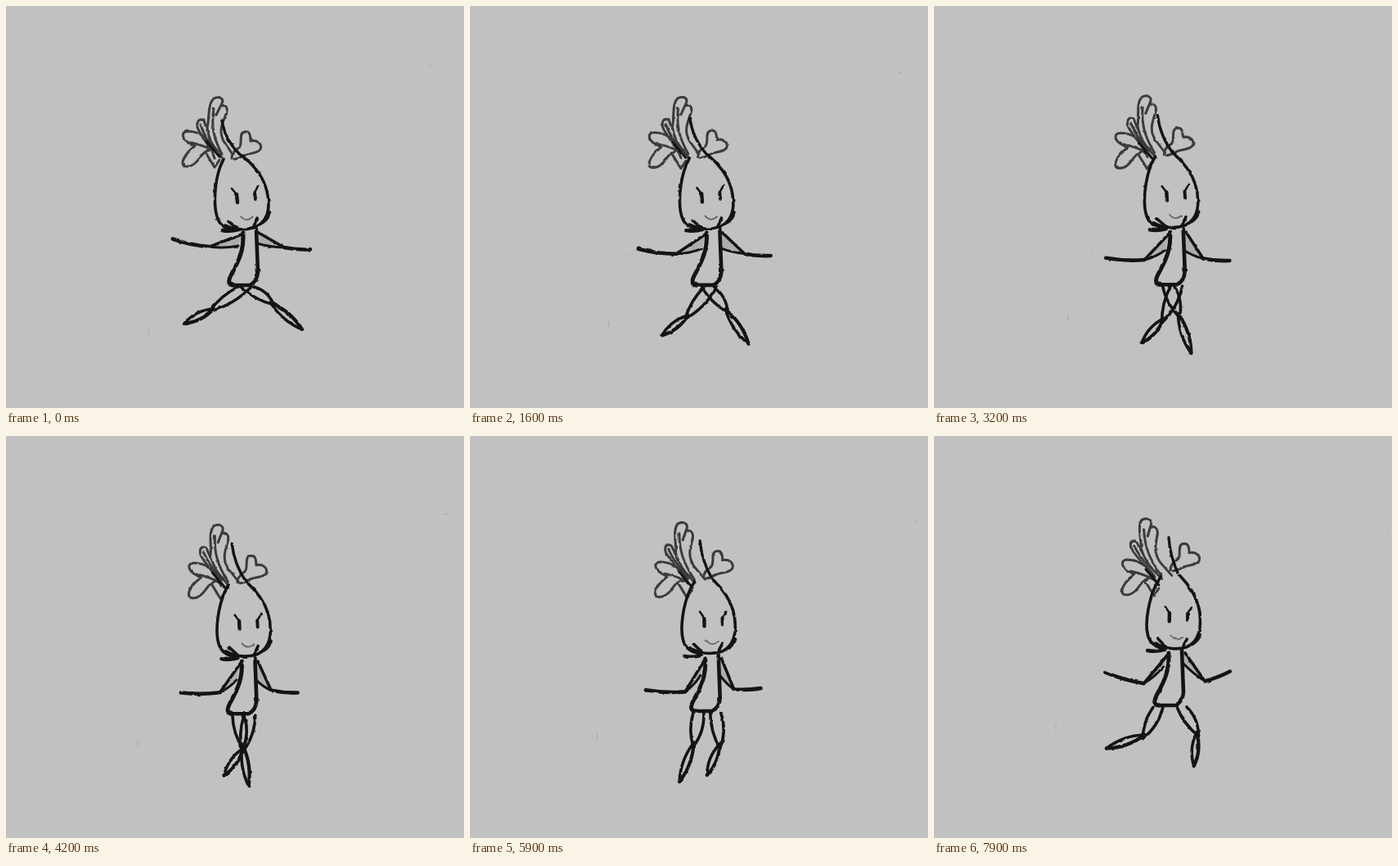
Write an HTML page that moves like this. It is 560 by 491 pixels and loops after 8000 ms.

```html
<!DOCTYPE html>
<html>
<head>
<meta charset="utf-8">
<style>
html, body { margin: 0; width: 100%; height: 100%; overflow: hidden; background: #c1c1c1; }
svg { display: block; }
</style>
</head>
<body>
<svg width="560" height="491" viewBox="0 0 560 491" fill="none" stroke-linecap="round" stroke-linejoin="round">
  <filter id="pencil" filterUnits="userSpaceOnUse" x="0" y="0" width="560" height="491" color-interpolation-filters="sRGB">
    <feTurbulence type="fractalNoise" baseFrequency=".12" numOctaves="2" seed="4"/>
    <feDisplacementMap in="SourceGraphic" scale="2.5" xChannelSelector="R" yChannelSelector="G"/>
    <feGaussianBlur stdDeviation=".7"/>
  </filter>
  <g id="figure" filter="url(#pencil)"></g>
</svg>
<script>
const LOOP = 8000, STEP = 100, END = 7900, PASS = 5100;

const mix = (a, b, u) => a + (b - a) * u;

// Linear tween over three poses: stretched, passing, stretched the other way
const swing = ([a, b, c], t) =>
  t < PASS ? mix(a, b, t / PASS) : mix(b, c, (t - PASS) / (END - PASS));

// Far end of a bone, from its angles in degrees and its first and last length
function joint([x, y], angles, [from, to], t) {
  const a = swing(angles, t) * Math.PI / 180, len = mix(from, to, t / END);
  return [x + len * Math.cos(a), y + len * Math.sin(a)];
}

const line = (d, width = 3.6, color = '#141414') =>
  `<path d="${d}" stroke="${color}" stroke-width="${width}"/>`;
const soft = (d, width = 3) => line(d, width, '#3b3b3b');
const group = (transform, body) => `<g transform="${transform}">${body}</g>`;

// Curve from p to q, pushed sideways by b
function bend([x, y], [X, Y], b) {
  const len = Math.hypot(X - x, Y - y) || 1;
  const cx = (x + X) / 2 - (Y - y) / len * b, cy = (y + Y) / 2 + (X - x) / len * b;
  return `M${x} ${y}Q${cx} ${cy} ${X} ${Y}`;
}

function leg([x, y], half, thigh, thighLen, shin, shinLen, t) {
  const knee = joint([x, y], thigh, thighLen, t), foot = joint(knee, shin, shinLen, t);
  const top = [mix(knee[0], x, .12), mix(knee[1], y, .12)];
  return line(bend([x - half, y], knee, 6)) + line(bend([x + half, y], knee, -8))
    + line(bend(top, foot, 8)) + line(bend(top, foot, -8), 4.2);
}

function arm(shoulder, side, upper, upperLen, fore, foreLen, sag, t) {
  const elbow = joint(shoulder, upper, upperLen, t), hand = joint(elbow, fore, foreLen, t);
  return `<path d="M${shoulder}L${elbow}L${side}Z" fill="#000" opacity=".1"/>`
    + line(bend(shoulder, elbow, 0)) + line(bend(side, elbow, sag), 3)
    + line(bend(elbow, hand, sag), 4.6);
}

const head = line('M266 187L262 196C255 215 253 245 259 260Q264 273 281 274')
  + line('M268 268Q287 277 307 269Q320 262 321 244C321 225 314 210 306 200Q299 191 289 183')
  + line('M272 263L282 271') + line('M303 269L307 259') + line('M314 264Q321 259 322 252', 4.4)
  + line('M276 223L282 230', 2.6) + line('M282 230L283 240', 4.4)
  + line('M308 220L304 228', 2.6) + line('M304 228L305 236', 4)
  + line('M287 257Q294 265 302 257', 1.8, '#666');

const torso = line('M290 277C291 300 284 312 275 329Q269 341 279 341', 5)
  + line('M276 341L298 341Q307 337 308 325L306 273', 4.6)
  + line('M264 274Q274 276 285 273', 4.4);

const blades = soft('M264 185C252 172 247 160 246 148C249 138 246 121 254 113C260 110 267 112 264 119L257 133')
  + soft('M264 122C269 120 272 125 269 132C264 145 260 152 266 165L277 181')
  + soft('M254 125C251 145 253 160 264 181')
  + soft('M255 186C251 172 237 158 234 148C233 140 237 137 242 140L246 152')
  + soft('M238 145C243 160 249 170 259 177');

const leftLeaf = soft('M256 174C248 162 236 153 222 153C214 154 215 161 222 166Q227 169 231 171C222 178 213 188 217 195C226 199 234 190 238 184Q242 178 250 175')
  + soft('M226 167Q242 170 256 178') + line('M245 165L261 184', 3) + soft('M244 179L255 197L261 188');

const rightLeaf = soft('M276 186Q276 178 285 173C290 168 284 156 291 154C298 152 299 158 299 165C306 163 314 168 311 175C307 181 297 179 290 183Q283 187 279 187');

function draw(t) {
  const p = t / END, up = -13 * p * p, rise = -12 * p ** 3;
  const lean = .2 * p, droop = Math.sin(Math.PI * p);
  const hipY = 343 + rise, half = 8 - 2 * p;
  const stem = bend([264 + 23 * p, 140 - 16 * p], [289 + 9 * p, 184 + up - 4 * p], 9 - 5 * p);

  figure.innerHTML =
    group(`matrix(1 0 ${lean} 1 ${-112 * lean} ${up * .82})`, blades)
    + group(`translate(${14 * p} ${3 * droop - 2 * p})`, leftLeaf)
    + group(`translate(${13 * p} ${up * 1.4 - 4 * p})`, rightLeaf)
    + line(stem, 3.4)
    + group(`translate(${p} ${up}) rotate(${7 * p} 290 270)`, head)
    + arm([288 - 2 * p, 279 + rise], [284 - 3 * p, 293 + 6 * droop + rise],
      [159, 118, 130], [42, 46], [192, 177, 196], [46, 49], -3, t)
    + arm([309 - 2 * p, 277 + rise], [307 - 2 * p, 290 + 10 * droop + rise],
      [30, 73, 55], [36, 42], [4, 5, -21], [32, 33], 2, t)
    + group(`translate(${-3 * p} ${rise})`, torso)
    + leg([292 + 11 * p, hipY], half, [145, 92, 60], [53, 41], [155, 123, 99], [34, 37], t)
    + leg([295 - 21 * p, hipY], half, [34, 92, 116], [39, 43], [41, 90, 165], [46, 46], t)
    // drifting specks
    + line(`M${519 + 36 * p} ${73 + 42 * p}h.5`, 1.2, '#888')
    + line(`M${174.5 - 25.5 * p} ${394 - 41 * p}v7`, 1, '#aaa')
    + line(`M${196 - 8 * p} ${312 - 33 * p}h.5`, 1.2, '#a4a4a4');
}

const figure = document.getElementById('figure');
let last = -1;
function tick() {
  const t = Math.floor(performance.now() % LOOP / STEP) * STEP;
  if (t !== last) draw(last = t);
  requestAnimationFrame(tick);
}
tick();
</script>
</body>
</html>
```
